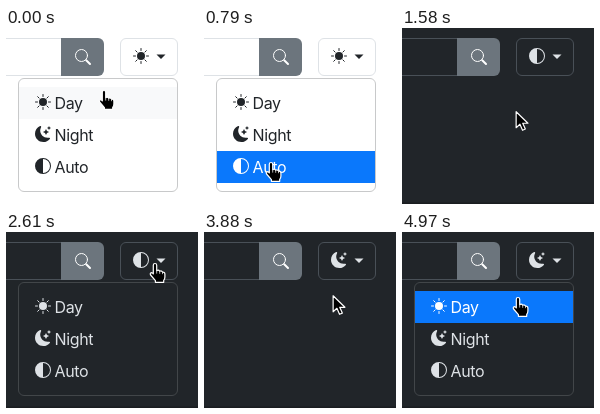
An HTML page for the animation above (5 s loop, 192x176 px).

```html
<!DOCTYPE html>
<html lang="en">
<head>
<meta charset="utf-8">
<title>Theme menu</title>
<style>
  html, body { margin: 0; height: 100%; overflow: hidden; }
  #stage {
    --bg: #fff; --fg: #212529; --line: #dee2e6; --edge: #c8c9ca; --hover: #f8f9fa; --foot: #fff;
    display: block; width: 192px; height: 176px; background: var(--bg);
  }
  #stage.dark {
    --bg: #212529; --fg: #dee2e6; --line: #495057; --edge: #424649; --hover: #2b3035; --foot: #1a1d20;
  }
  .box { fill: var(--bg); stroke: var(--line); }
  #menu .box { stroke: var(--edge); }
  .row rect { fill: transparent; }
  .row { fill: var(--fg); color: var(--fg); }
  .row.hover rect { fill: var(--hover); }
  .row.active { fill: #fff; color: #fff; }
  .row.active rect { fill: #0a78fc; }
  text { font: 16px Inter, Roboto, sans-serif; letter-spacing: -.35px; }
  #toggle { fill: var(--fg); color: var(--fg); }
  #cursor path { fill: #000; stroke: #fff; stroke-width: 1.2; stroke-linejoin: round; }
  #cursor .crease { fill: none; stroke-width: .7; }
</style>
</head>
<body>
<svg id="stage" viewBox="0 0 192 176">
  <defs>
    <g id="sun">
      <circle cx="8" cy="8" r="4"/>
      <path d="M8 .5v2M8 13.5v2M.5 8h2M13.5 8h2M2.7 2.7l1.4 1.4M11.9 11.9l1.4 1.4M2.7 13.3l1.4-1.4M11.9 4.1l1.4-1.4"
        stroke="currentColor" stroke-linecap="round"/>
    </g>
    <g id="moon">
      <path d="M6 .28a.77.77 0 0 1 .08.86 7.2 7.2 0 0 0-.88 3.46c0 4.02 3.28 7.27 7.32 7.27.53 0 1.04-.05 1.53-.16a.79.79 0 0 1 .81.32.73.73 0 0 1-.03.89A8.35 8.35 0 0 1 8.34 16C3.73 16 0 12.29 0 7.71 0 4.27 2.11 1.31 5.12.06A.75.75 0 0 1 6 .28z"/>
      <path d="M11 2.9q.5 2.6 3.1 3.1-2.6.5-3.1 3.1-.5-2.6-3.1-3.1 2.6-.5 3.1-3.1zM14 0q.3 1.7 2 2-1.7.3-2 2-.3-1.7-2-2 1.7-.3 2-2z"/>
    </g>
    <path id="half" d="M8 15A7 7 0 1 0 8 1zM8 16A8 8 0 1 1 8 0a8 8 0 0 1 0 16z" fill-rule="evenodd"/>
  </defs>

  <rect y="174.5" width="192" height="1.5" fill="var(--foot)"/>
  <path class="box" id="field" d="M-2 10.5H56V47.5H-2z"/>
  <path d="M55 10H92a6 6 0 0 1 6 6V42a6 6 0 0 1-6 6H55z" fill="#6c757d"/>
  <g fill="none" stroke="#fff" stroke-linecap="round">
    <circle cx="75.5" cy="27.5" r="6"/>
    <path d="M80.2 32.2l3.8 3.8" stroke-width="2"/>
  </g>

  <rect class="box" id="button" x="114.5" y="10.5" width="57" height="37" rx="5.5"/>
  <g id="toggle">
    <use id="icon" x="127" y="20"/>
    <path d="M150.5 26.5h9l-4.5 4.6z"/>
  </g>

  <g id="menu">
    <rect class="box" x="12.5" y="50.5" width="159" height="113" rx="5.5"/>
  </g>

  <g id="cursor">
    <path id="arrow" d="M0 0V16l3.8-3.5 2.6 6 2.8-1.2-2.6-5.8h5.2z"/>
    <g id="hand">
      <path d="M-1.7 1.2a1.7 1.7 0 0 1 3.4 0V6.6q2-1 3 .6 2-.8 2.8.9 2.3-.3 2.4 1.8V13q0 2-1.2 3.4V18.3H.4V16.6L-4.4 11q-1-2 .9-2.4 1 0 1.8 1.3z"/>
      <path class="crease" d="M1.7 6.6V9.6M4.7 7.2V9.8M7.5 8.1V10.2"/>
    </g>
  </g>
</svg>

<script>
const LOOP = 5000, TOP = 59, ROW = 32;
const $ = id => document.getElementById(id);

// Cursor tip: time, x, y
const PATH = [
  [0, 98, 63], [40, 98, 63], [520, 62, 137], [590, 62, 137], [790, 67, 135],
  [825, 67, 135], [1030, 84, 128], [1370, 84, 128], [1580, 114, 84],
  [1800, 146, 24], [1940, 149, 32], [2610, 149, 32], [3090, 100, 110],
  [3640, 100, 110], [3880, 129, 64], [3970, 143, 43], [4090, 145, 41],
  [4270, 145, 41], [4700, 116, 66], [LOOP, 116, 66]
];
// Start time and state: menu open, pressed row (-1 for none), theme, button icon
const STATES = [
  [0, true, -1, 'light', 'sun'],
  [610, true, 2, 'light', 'sun'],
  [850, false, -1, 'dark', 'half'],
  [2610, true, -1, 'dark', 'half'],
  [3450, true, 1, 'dark', 'half'],
  [3660, false, -1, 'dark', 'moon'],
  [4270, true, -1, 'dark', 'moon'],
  [4940, true, 0, 'dark', 'moon']
];

const rows = [['sun', 'Day'], ['moon', 'Night'], ['half', 'Auto']].map(([icon, label], i) => {
  const y = TOP + i * ROW;
  $('menu').insertAdjacentHTML('beforeend', `<g class="row">
    <rect x="13" y="${y}" width="158" height="${ROW}"/>
    <use href="#${icon}" x="29" y="${y + 7}"/>
    <text x="48.5" y="${y + 21.5}">${label}</text></g>`);
  return $('menu').lastElementChild;
});

const same = (a, b) => a[1] === b[1] && a[2] === b[2];

// Velocity at a waypoint, zero where the cursor rests
function slope(i, axis) {
  const a = PATH[i - 1], b = PATH[i], c = PATH[i + 1];
  if (!a || !c || same(a, b) || same(b, c)) return 0;
  return (c[axis] - a[axis]) / (c[0] - a[0]);
}

function cursorAt(t) {
  const i = PATH.findIndex(p => p[0] > t) - 1;
  const a = PATH[i], b = PATH[i + 1], span = b[0] - a[0], u = (t - a[0]) / span;
  const s = u * u * (3 - 2 * u);
  return [1, 2].map(k => a[k] + (b[k] - a[k]) * s +
    span * u * (1 - u) * (slope(i, k) * (1 - u) - slope(i + 1, k) * u));
}

const show = (el, on) => el.setAttribute('visibility', on ? 'visible' : 'hidden');

function draw(t) {
  const [, open, pressed, theme, icon] = STATES.findLast(s => s[0] <= t);
  const [x, y] = cursorAt(t);
  const over = open && x > 13 && x < 171 ? Math.floor((y - TOP) / ROW) : -1;
  const onRow = over >= 0 && over < rows.length;
  const onButton = x > 114 && x < 172 && y > 10 && y < 48;

  $('stage').setAttribute('class', theme);
  $('icon').setAttribute('href', '#' + icon);
  $('menu').style.display = open ? '' : 'none';
  rows.forEach((row, i) => {
    row.setAttribute('class', 'row' + (i === pressed ? ' active' : i === over ? ' hover' : ''));
  });

  // Borders fade after the theme switch
  const fade = Math.min(100, Math.max(0, (t - 850) / 1.5));
  const line = `color-mix(in srgb, #495057 ${fade}%, #dee2e6)`;
  $('field').style.stroke = $('button').style.stroke = line;

  $('cursor').setAttribute('transform', `translate(${x.toFixed(2)} ${y.toFixed(2)})`);
  show($('hand'), onRow || onButton);
  show($('arrow'), !onRow && !onButton);
}

const start = performance.now();
function tick() {
  draw((performance.now() - start) % LOOP);
  requestAnimationFrame(tick);
}
tick();
</script>
</body>
</html>
```
